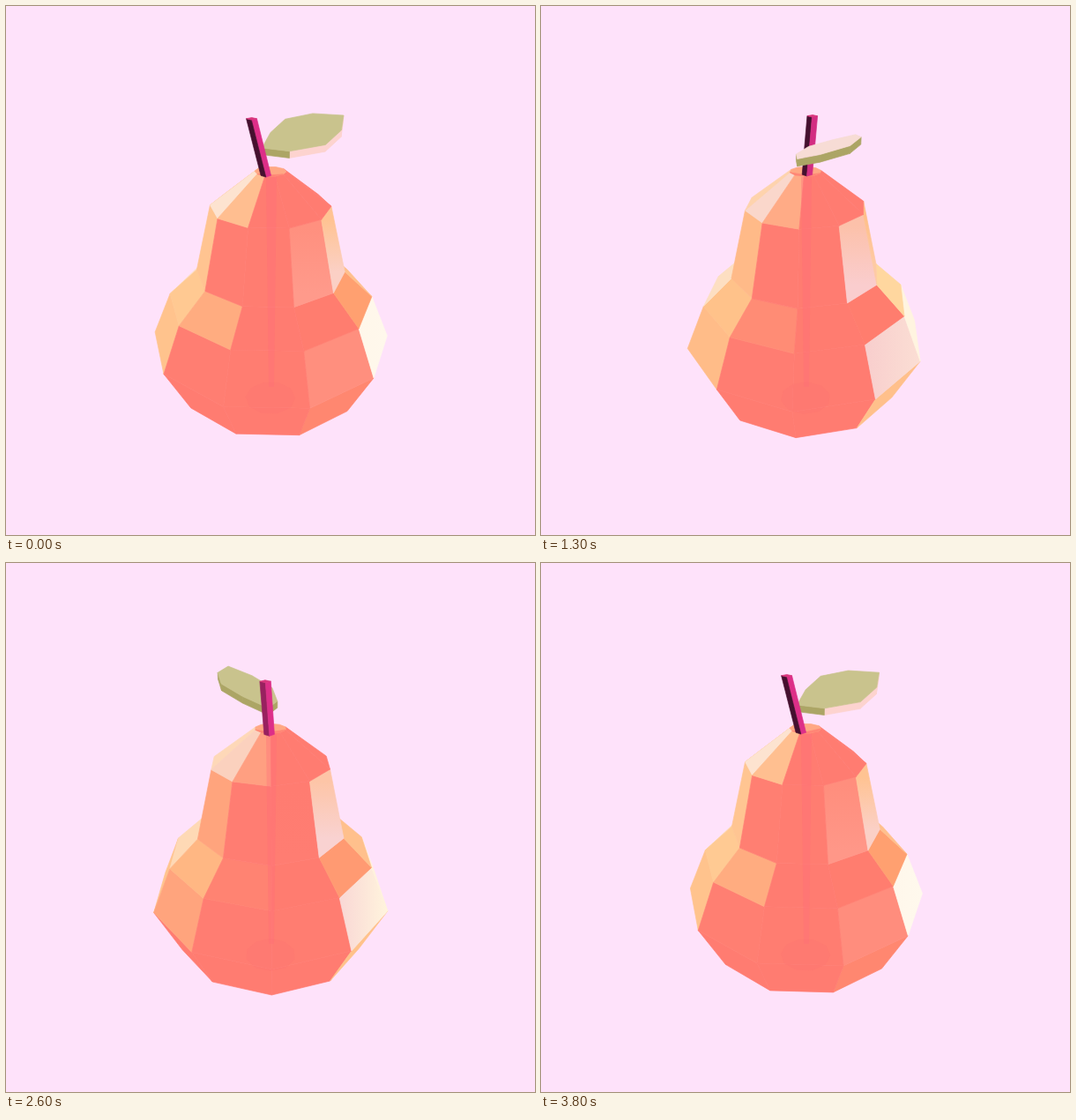
Write an HTML page with a canvas that moves like this. It is 600x600 px and loops after 3.9 s.

```html
<!DOCTYPE html>
<html lang="en">
<head>
<meta charset="utf-8">
<title>Low-poly pear</title>
<style>
  html, body { margin: 0; width: 100%; height: 100%; overflow: hidden; background: #fee2fa; }
  canvas { display: block; width: 600px; height: 600px; }
</style>
</head>
<body>
<canvas id="stage" width="600" height="600"></canvas>
<script>
const ctx = document.getElementById('stage').getContext('2d');
const LOOP = 3900, STEP = 100, SIDES = 10, SLICE = 36, FIRST = 16.3, CAMERA = 650;
const RAD = Math.PI / 180;
const PITCH = 27 * RAD, SIN = Math.sin(PITCH), COS = Math.cos(PITCH);
const CORAL = '#ff7c71';

// Lathe profile, top to bottom: [radius, height].
const RINGS = [[16.5, 116], [65, 78], [84, -0.5], [117, -32], [139.5, -85.5], [111, -146]];
const BASE_RING = [32, -182];

// Shade of each band by facing angle (0 = viewer, positive = right).
// "down" and "across" hold the far end of a vertical or horizontal gradient.
const NECK_LEFT = [[-95, '#ffc896'], [-75, '#ffc592'], [-59, '#ffba88'], [-54, '#ffa67e'], [-38, '#ff7e72'], [18, CORAL]];
const BELLY_LEFT = [[-76, '#ffc48e'], [-59, '#ffbc88'], [-54, '#ffa67e'], [-38, '#ff7e72'], [18, CORAL],
                    [31, '#ff8876'], [35, '#ff9080']];
const BANDS = [
  { base: [[-109, '#ffc896'], [-75, '#fde4d0'], [-57, '#fad5ca'], [-40, '#ffc191'],
           [-20, '#ffa684'], [-5, CORAL]] },
  { base: [...NECK_LEFT, [31, '#ff8574'], [36, '#ff9684'], [50, '#fcc6ae'], [70, '#ffc392'], [90, '#ffbe84']],
    down: [...NECK_LEFT, [31, '#ff8b7c'], [36, '#ffa293'], [50, '#f9d2d4'], [70, '#fbd0c6'], [90, '#ffc898']] },
  { base: [[-95, '#fddfc2'], [-75, '#ffca93'], [-59, '#ffc28a'], [-54, '#ffb883'], [-37, '#ffab80'],
           [-20, '#ff8472'], [-4, CORAL], [49, '#ff7d6e'], [54, '#ff9a72'], [71, '#ffa070'],
           [85, '#ffd8a0'], [90, '#ffc08c']] },
  { base: [...BELLY_LEFT, [49, '#f8d0cf'], [54, '#f9d5d4'], [68, '#fff7ec'], [90, '#fff3dc']],
    across: [...BELLY_LEFT, [49, '#fbe0d6'], [54, '#fff4dc'], [68, '#fff9ee'], [90, '#fff3dc']] },
  { base: [[-50, CORAL], [20, CORAL], [35, '#ff8870'], [49, '#ffc28c'], [71, '#ffc184']] }
];

// Leaf outline: distance along the blade, distance across it.
const LEAF = [[-6, -7], [15, -24], [40, -34], [68, -22], [90, 4], [72, 24], [45, 33], [12, 17]];
const LEAF_DIR = 122, STEM_DIR = 253;

const clamp = v => Math.max(0, Math.min(1, v));
const cosd = a => Math.cos(a * RAD);
const sind = a => Math.sin(a * RAD);
const wrap = a => ((a + 180) % 360 + 360) % 360 - 180;

function mix(a, b, k) {
  const part = i => {
    const from = parseInt(a.substr(i, 2), 16), to = parseInt(b.substr(i, 2), 16);
    return Math.round(from + (to - from) * k).toString(16).padStart(2, '0');
  };
  return '#' + part(1) + part(3) + part(5);
}

function shade(stops, angle) {
  if (angle <= stops[0][0]) return stops[0][1];
  for (let i = 1; i < stops.length; i++) {
    const [a0, c0] = stops[i - 1], [a1, c1] = stops[i];
    if (angle <= a1) return mix(c0, c1, (angle - a0) / (a1 - a0));
  }
  return stops[stops.length - 1][1];
}

function project(x, y, z) {
  const scale = CAMERA / (CAMERA - z * COS - y * SIN);
  return [300 + x * scale, 300 - (y * COS - z * SIN) * scale];
}

const polar = (radius, height, angle) =>
  project(radius * sind(angle), height, radius * cosd(angle));

const ringPoints = ([radius, height], spin) =>
  Array.from({ length: SIDES }, (_, i) => polar(radius, height, FIRST + i * SLICE - spin));

const faceAngle = (i, spin) => wrap(FIRST + (i + 0.5) * SLICE - spin);

function area(points) {
  return points.reduce((sum, [x, y], i) => {
    const [nx, ny] = points[(i + 1) % points.length];
    return sum + x * ny - nx * y;
  }, 0);
}

function fill(points, paint, seam = true) {
  ctx.beginPath();
  points.forEach(p => ctx.lineTo(p[0], p[1]));
  ctx.closePath();
  ctx.fillStyle = paint;
  ctx.fill();
  if (seam) {
    ctx.strokeStyle = paint;
    ctx.lineWidth = 0.7;
    ctx.stroke();
  }
}

function bandPaint({ base, down, across }, quad, angle) {
  const near = shade(base, angle), far = down || across;
  if (!far) return near;
  const [a, , c] = quad;
  const g = down ? ctx.createLinearGradient(0, a[1], 0, c[1])
                 : ctx.createLinearGradient(a[0], 0, c[0], 0);
  g.addColorStop(0, near);
  g.addColorStop(1, shade(far, angle));
  return g;
}

function drawBody(spin) {
  const rings = RINGS.map(r => ringPoints(r, spin));
  for (let b = BANDS.length - 1; b >= 0; b--) {
    for (let i = 0; i < SIDES; i++) {
      const j = (i + 1) % SIDES;
      const quad = [rings[b][i], rings[b][j], rings[b + 1][j], rings[b + 1][i]];
      if (area(quad) > 0) fill(quad, bandPaint(BANDS[b], quad, faceAngle(i, spin)));
    }
  }
  // Core and underside showing faintly through the skin.
  fill([[295, 194], [307, 194], [304, 432], [298, 432]], 'rgba(255,108,120,0.35)', false);
  fill(ringPoints(BASE_RING, spin), 'rgba(250,104,112,0.18)', false);

  fill(rings[0], '#ffa884');
  const centre = project(0, 112, 0);
  rings[0].forEach((p, i) => {
    if (Math.abs(faceAngle(i, spin)) < 70) fill([p, rings[0][(i + 1) % SIDES], centre], '#ff8676');
  });
}

function drawStem(spin) {
  const section = (radius, height) => {
    const dir = STEM_DIR - spin;
    const cx = radius * sind(dir), cz = radius * cosd(dir);
    return [0, 1, 2, 3].map(k => project(
      cx + 5.3 * sind(90 * k - spin), height, cz + 5.3 * cosd(90 * k - spin)));
  };
  const top = section(20, 169), low = section(5, 111);
  const lean = 0.6 * clamp(cosd(spin - 275));
  for (let k = 0; k < 4; k++) {
    const n = (k + 1) % 4;
    const quad = [top[k], top[n], low[n], low[k]];
    if (area(quad) <= 0) continue;
    const light = 0.45 + wrap(45 + 90 * k - spin) / 85 + lean;
    fill(quad, mix('#45102f', '#dd2f88', clamp(light)));
  }
  fill(top, '#d8357c');
}

function drawLeaf(spin) {
  const dir = LEAF_DIR - spin;
  const place = ([u, v], drop) => project(
    u * sind(dir) + v * sind(dir - 90),
    140 + 0.28 * u - 0.23 * v - drop,
    u * cosd(dir) + v * cosd(dir - 90));
  const top = LEAF.map(p => place(p, 0));
  const under = LEAF.map(p => place(p, 7));
  const pinkRim = clamp((cosd(spin + 25) - 0.5) / 0.3);
  const pinkTop = clamp((cosd(spin - 85) - 0.15) / 0.4);

  LEAF.forEach(([u, v], i) => {
    const n = (i + 1) % LEAF.length;
    const quad = [top[n], top[i], under[i], under[n]];
    if (area(quad) <= 0) return;
    const du = LEAF[n][0] - u, dv = LEAF[n][1] - v;
    const facing = wrap(dir - Math.atan2(-du, dv) / RAD);
    fill(quad, mix('#aca565', '#fdd3cf', facing > -15 ? pinkRim : 0));
  });
  if (area(top) > 0) fill(top, mix('#c9c38d', '#f7dcd5', pinkTop));
  else fill(under, '#aca565');
}

function draw(ms) {
  const u = Math.floor(ms % LOOP / STEP) * STEP / LOOP;
  const spin = 361.3 * u * u * (3 - 2 * u);
  ctx.fillStyle = '#fee2fa';
  ctx.fillRect(0, 0, 600, 600);
  drawBody(spin);
  const parts = [drawLeaf, drawStem];
  if (cosd(LEAF_DIR - spin) > 0) parts.reverse();
  parts.forEach(part => part(spin));
}

const start = performance.now();
function tick() {
  draw(performance.now() - start);
  requestAnimationFrame(tick);
}
tick();
</script>
</body>
</html>
```
